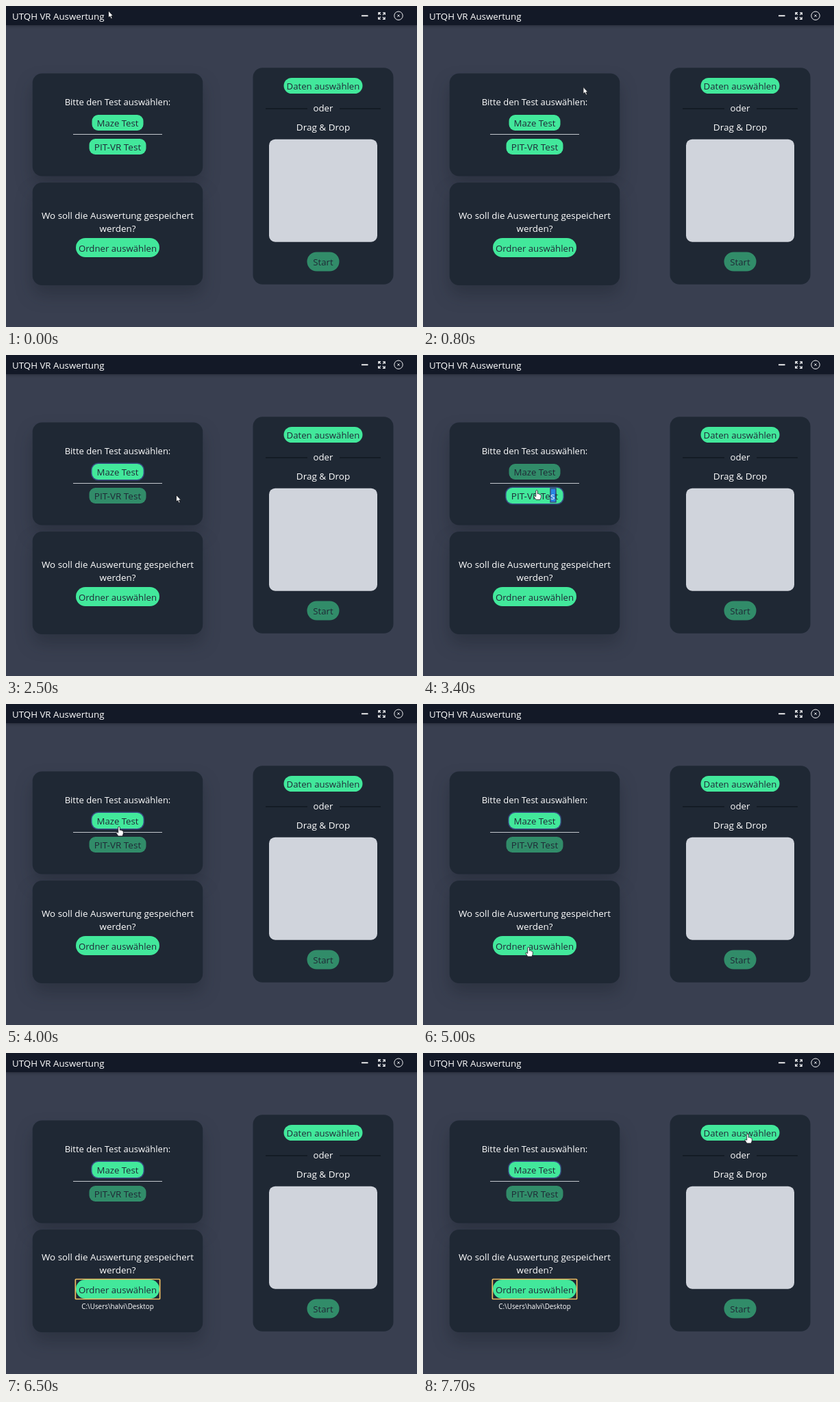
These frames come from a looping animation (600 px wide and 469 px high, 8 s). An HTML page:

```html
<!DOCTYPE html>
<html lang="de">
<head>
<meta charset="utf-8">
<style>
  html, body { margin: 0; width: 100%; height: 100%; overflow: hidden; background: #393f50; }
  svg { display: block; width: 600px; height: 469px; font: 500 13.2px "Open Sans", "Noto Sans", sans-serif; }
  text { fill: #fff; text-anchor: middle; white-space: pre; }
  .title { text-anchor: start; }
  .bar { filter: drop-shadow(0 1px 2px rgba(0, 0, 0, .3)); }
  .card { fill: #1f2834; }
  .shadow { filter: drop-shadow(0 14px 12px rgba(15, 20, 30, .28)); }
  .button rect { fill: #42e89b; }
  .button text { fill: #1f2937; font-weight: 400; }
  .dim { opacity: .52; }
  .focus rect { stroke: #36497f; stroke-width: 3px; paint-order: stroke; }
  .icon { fill: none; stroke: #f3f4f6; }
  .outline { fill: none; stroke: #f0be62; stroke-width: 1.7px; }
  .pointer { fill: #fff; stroke: #15181f; stroke-width: .9px; stroke-linejoin: round; }
</style>
</head>
<body>
<svg id="stage" viewBox="0 0 600 469"></svg>
<script>
const LOOP = 8000, TICK = 100;
const LEFT = 163, RIGHT = 463;
const $ = id => document.getElementById(id);

const buttons = {
  maze: { label: "Maze Test", x: LEFT, y: 170.5, w: 75, h: 23, r: 9 },
  pit: { label: 'PIT-VR Te<tspan id="letter">s</tspan>t', x: LEFT, y: 205.5, w: 83, h: 23, r: 9, size: 13.5 },
  folder: { label: "Ordner auswählen", x: LEFT, y: 353, w: 122, h: 28 },
  data: { label: "Daten auswählen", x: RIGHT, y: 116.5, w: 115, h: 23 },
  start: { label: "Start", x: RIGHT, y: 373.5, w: 47, h: 28 }
};

const box = (x, y, w, h, r, attrs = "") =>
  `<rect x="${x - w / 2}" y="${y - h / 2}" width="${w}" height="${h}" rx="${r}" ${attrs}/>`;
const label = (text, x, y, size = 13.2, attrs = "") =>
  `<text x="${x}" y="${y}" font-size="${size}" ${attrs}>${text}</text>`;
const line = (x1, x2, y, color, width = 1) =>
  `<path d="M${x1} ${y}H${x2}" stroke="${color}" stroke-width="${width}"/>`;

function button(id, extra = "") {
  const b = buttons[id];
  return `<g id="${id}" class="button">${box(b.x, b.y, b.w, b.h, b.r || b.h / 2)}${extra}
    ${label(b.label, b.x, Math.round(b.y + 5.5), b.size)}</g>`;
}

const corners = [0, 90, 180, 270].map(angle =>
  `<path d="M1.6 -1.4L4.6 -4.4M1.6 -4.6H4.8V-1.4" stroke-width="1.2" transform="rotate(${angle})"/>`).join("");

$("stage").innerHTML = `
  <rect class="bar" width="600" height="28" fill="#131927"/>
  ${label("UTQH VR Auswertung", 9, 20, 13.3, 'class="title"')}
  <g class="icon">
    ${line(519, 528.5, 14.3, "#fff", 1.8)}
    <g transform="translate(548.5 14.5)">${corners}</g>
    <g transform="translate(573 14.2)"><circle r="6.2"/><path d="M-1.6 -1.6L1.6 1.6M1.6 -1.6L-1.6 1.6"/></g>
  </g>
  ${box(LEFT, 173.5, 248.5, 150, 14, 'class="card shadow"')}
  ${box(LEFT, 333, 248.5, 150, 14, 'class="card shadow"')}
  ${box(RIGHT, 248.5, 205, 316.5, 14, 'class="card"')}

  ${label("Bitte den Test auswählen:", LEFT, 145, 13)}
  ${button("maze")}
  ${line(98, 228, 187.5, "#c3c7cd")}
  ${button("pit", box(190, 205, 6.5, 18.5, 0, 'id="mark" style="fill:#2b86e3"'))}

  <g id="save">
    ${label("Wo soll die Auswertung gespeichert", LEFT, 311, 13.4)}
    ${label("werden?", LEFT, 330, 13.4)}
    ${button("folder")}
    ${box(LEFT, 353, 123.3, 29, 1, 'id="outline" class="outline"')}
    ${label("C:\\Users\\halvi\\Desktop", LEFT, 382, 9.9, 'id="path"')}
  </g>

  ${button("data")}
  ${line(379, 440, 150, "#111820", 1.3)}${line(487, 547, 150, "#111820", 1.3)}
  ${label("oder", RIGHT, 154)}
  ${label("Drag &amp; Drop", RIGHT, 182, 13.5)}
  ${box(RIGHT, 269.7, 158, 150, 9, 'fill="#d0d4dc"')}
  ${button("start")}

  <g id="pointer" class="pointer">
    <path id="arrow" d="M0 0V10L2.3 8L4 11.8L5.7 11L4.1 7.5H7Z"/>
    <path id="hand" transform="scale(.9)"
      d="M-1.4 1Q0 -1 1.4 1V6Q3 5 4 6.4Q7 6.4 7 8.5V11.5L5.6 15.5H-1.3L-4.8 10Q-4.8 8 -1.4 10.3Z"/>
  </g>`;

// Each move ends at a spot; between moves the pointer rests
const moves = [
  { from: 0, to: 100, x: 408, y: 8 },
  { from: 400, to: 1000, x: 173, y: 157 },
  { from: 1000, to: 1300, x: 432, y: 116 },
  { from: 1300, to: 1500, x: 173, y: 160 },
  { from: 2100, to: 2500, x: 248.5, y: 204.5 },
  { from: 2500, to: 3000, x: 166, y: 197.5 },
  { from: 3500, to: 3900, x: 165, y: 179 },
  { from: 4400, to: 5000, x: 154, y: 355 },
  { from: 5500, to: 5700, x: 58, y: 424 },
  { from: 5800, to: 5900, x: 122, y: 430 },
  { from: 6900, to: 7700, x: 474, y: 118 }
];

function pointerAt(t) {
  let x = 149.5, y = 7;
  for (const m of moves) {
    const u = Math.min(1, Math.max(0, (t - m.from) / (m.to - m.from)));
    const k = u * u * (3 - 2 * u);
    x += (m.x - x) * k;
    y += (m.y - y) * k;
  }
  return [x, y];
}

const show = (id, on) => $(id).setAttribute("visibility", on ? "visible" : "hidden");
const style = (id, state) => $(id).setAttribute("class", "button " + state);
const within = (b, x, y) => Math.abs(x - b.x) <= b.w / 2 && Math.abs(y - b.y) <= b.h / 2;

function draw(now) {
  const t = Math.floor(now % LOOP / TICK) * TICK;
  const choice = t < 1900 ? "" : t >= 3100 && t < 4000 ? "pit" : "maze";
  for (const id of ["maze", "pit"]) style(id, choice && (choice === id ? "focus" : "dim"));

  const marked = t >= 3200 && t < 4000;
  show("mark", marked);
  $("letter").style.fill = marked ? "#fff" : "";

  const saved = t >= 6500;
  $("save").setAttribute("transform", `translate(0 ${saved ? -8 : 0})`);
  show("outline", t >= 5200);
  show("path", saved);

  const [x, y] = pointerAt(t);
  const visible = t < 5800 || t >= 7000;
  const over = Object.values(buttons).some(b => within(b, x, y));
  $("pointer").setAttribute("transform", `translate(${x} ${y})`);
  show("arrow", visible && !over);
  show("hand", visible && over);
}

style("start", "dim");
const begin = performance.now();
(function loop() {
  draw(performance.now() - begin);
  requestAnimationFrame(loop);
})();
</script>
</body>
</html>
```
